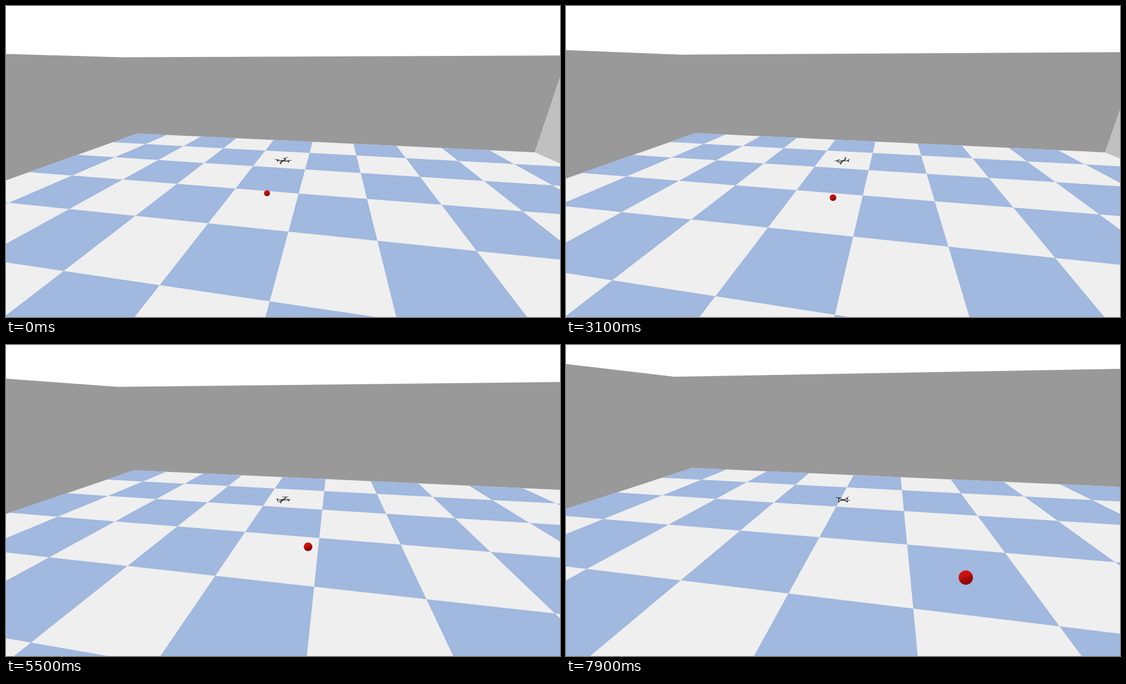
Write an HTML page with a canvas that moves like this. It is 998 px wide and 561 px high and loops after 8000 ms.

```html
<!DOCTYPE html>
<html lang="en">
<head>
<meta charset="utf-8">
<title>Drone flight</title>
<style>
  html, body { margin: 0; width: 100%; height: 100%; overflow: hidden; background: #fff; }
  canvas { display: block; width: 998px; height: 561px; }
</style>
</head>
<body>
<canvas id="stage" width="998" height="561"></canvas>
<script>
const W = 998, H = 561, LOOP = 8000, STEP = 100;
const ctx = document.getElementById('stage').getContext('2d');
const rad = d => d * Math.PI / 180;

// Camera: 60 degree field of view, looking down 20 degrees, turned 10 degrees
const FOCAL = H / 2 / Math.tan(rad(30));
const SP = Math.sin(rad(20)), CP = Math.cos(rad(20));
const SY = Math.sin(rad(10)), CY = Math.cos(rad(10));

// Room in floor tiles
const NEAR = 0.05, MIN = 0.09, MAX = 9.91, WALL = 2;
const BALL = { x: 4.998, y: 5, z: 0.996, r: 0.021 };

// seconds, camera x, camera y, camera height, drone tilt, drone yaw
const KEYS = [
  [0,   5.404, 6.656, 1.852, -4,  24],
  [1.5, 5.394, 6.611, 1.838, -13, 20],
  [3.1, 5.325, 6.491, 1.795, -13, 30],
  [4.7, 5.176, 6.283, 1.708, -12, 20],
  [6.2, 4.987, 6.038, 1.606, -3,  34],
  [7,   4.883, 5.894, 1.552, -3,  42],
  [7.9, 4.759, 5.718, 1.479, 0,   45]
];

function slope(i, k) {
  const a = KEYS[Math.max(i - 1, 0)], b = KEYS[Math.min(i + 1, KEYS.length - 1)];
  return (b[k] - a[k]) / (b[0] - a[0]);
}

// Smooth cubic curve through the keys
function sample(t, k) {
  let i = 0;
  while (i < KEYS.length - 2 && t > KEYS[i + 1][0]) i++;
  const a = KEYS[i], b = KEYS[i + 1], d = b[0] - a[0], s = (t - a[0]) / d;
  const s2 = s * s, s3 = s2 * s;
  return (2 * s3 - 3 * s2 + 1) * a[k] + (s3 - 2 * s2 + s) * d * slope(i, k)
    + (3 * s2 - 2 * s3) * b[k] + (s3 - s2) * d * slope(i + 1, k);
}

let cam;

function toCamera([x, y, z]) {
  const c = x - cam.x, a = cam.y - y, w = cam.h - z;
  const u = a * CY - c * SY;
  return [c * CY + a * SY, w * CP - u * SP, u * CP + w * SP];
}

const toScreen = ([x, y, z]) => [W / 2 + FOCAL * x / z, H / 2 + FOCAL * y / z];

function clipNear(pts) {
  const out = [];
  pts.forEach((p, i) => {
    const q = pts[(i + 1) % pts.length];
    if (p[2] >= NEAR) out.push(p);
    if ((p[2] >= NEAR) !== (q[2] >= NEAR)) {
      const s = (NEAR - p[2]) / (q[2] - p[2]);
      out.push(p.map((v, k) => v + (q[k] - v) * s));
    }
  });
  return out;
}

function face(color, pts) {
  const shape = clipNear(pts.map(toCamera)).map(toScreen);
  if (shape.length < 3) return;
  ctx.fillStyle = color;
  ctx.beginPath();
  shape.forEach(p => ctx.lineTo(...p));
  ctx.fill();
}

const tile = (color, x0, y0, x1, y1) =>
  face(color, [[x0, y0, 0], [x1, y0, 0], [x1, y1, 0], [x0, y1, 0]]);

function drawRoom() {
  const low = -0.2; // walls reach under the floor so that no seam shows
  const near = cam.y - 0.2, side = cam.y - 1.5;
  face('#999999', [
    [MIN, near, WALL], [MIN, MIN, WALL], [MAX, MIN, WALL],
    [MAX, MIN, low], [MIN, MIN, low], [MIN, near, low]
  ]);
  face('#bfbfbf', [[MAX, MIN, WALL], [MAX, side, WALL], [MAX, side, low], [MAX, MIN, low]]);
  tile('#efefef', MIN, MIN, MAX, MAX);
  for (let i = 0; i < 10; i++) {
    for (let j = i % 2; j < 10; j += 2) {
      tile('#a1b8df', Math.max(i, MIN), Math.max(j, MIN),
        Math.min(i + 1, MAX), Math.min(j + 1, MAX));
    }
  }
}

function drawBall() {
  const p = toCamera([BALL.x, BALL.y, BALL.z]);
  const [x, y] = toScreen(p), r = FOCAL * BALL.r / p[2];
  const shade = ctx.createLinearGradient(x - r * 0.4, y - r, x + r * 0.4, y + r);
  shade.addColorStop(0, '#dc160c');
  shade.addColorStop(0.45, '#bd1009');
  shade.addColorStop(0.6, '#9c0c08');
  shade.addColorStop(1, '#860a07');
  ctx.fillStyle = shade;
  ctx.beginPath();
  ctx.arc(x, y, r, 0, 2 * Math.PI);
  ctx.fill();
}

function line(color, width, x0, y0, x1, y1) {
  ctx.strokeStyle = color;
  ctx.lineWidth = width;
  ctx.beginPath();
  ctx.moveTo(x0, y0);
  ctx.lineTo(x1, y1);
  ctx.stroke();
}

function drawDrone(t) {
  const yaw = rad(sample(t, 5));
  ctx.save();
  ctx.translate(499, 279.5);
  ctx.rotate(rad(sample(t, 4)));
  for (let i = 0; i < 4; i++) {
    const a = yaw + i * Math.PI / 2;
    const x = 11 * Math.cos(a), y = 11 * SP * Math.sin(a);
    const spin = t * 23 + i * 1.9;
    const px = 5.5 * Math.cos(spin), py = 5.5 * SP * Math.sin(spin);
    line('#444', 1.2, 0, 0, x, y);
    line('#333', 1.8, x, y - 1.5, x, y + 2);
    line('#333', 0.9, x - px, y - 1.5 - py, x + px, y - 1.5 + py);
  }
  ctx.fillStyle = '#3a3a3a';
  ctx.fillRect(-4, -1.5, 8, 2.5);
  ctx.restore();
}

function frame() {
  const ms = performance.now() % LOOP;
  const t = Math.floor(ms / STEP) * STEP / 1000;
  cam = { x: sample(t, 1), y: sample(t, 2), h: sample(t, 3) };
  ctx.fillStyle = '#fff';
  ctx.fillRect(0, 0, W, H);
  drawRoom();
  drawDrone(t);
  drawBall();
  requestAnimationFrame(frame);
}
frame();
</script>
</body>
</html>
```
